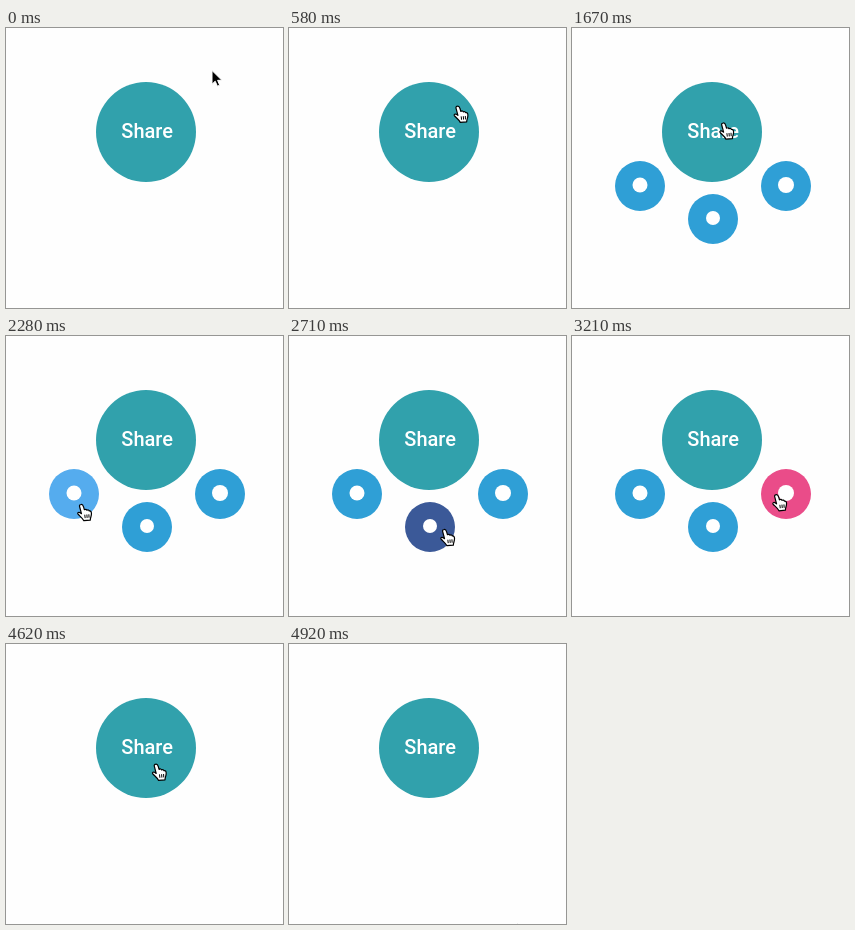
These frames come from a looping animation (277 by 280 pixels, 5.7 s). An HTML page:

```html
<!DOCTYPE html>
<html lang="en">
<head>
<meta charset="utf-8">
<title>Share button</title>
<style>
  html, body { margin: 0; width: 100%; height: 100%; overflow: hidden; background: #fefefe; }
  svg { display: block; width: 277px; height: 280px; }
  text { font: 500 20px Roboto, sans-serif; fill: #fff; }
</style>
</head>
<body>
<svg viewBox="0 0 277 280">
  <g id="bubbles"></g>
  <circle cx="140" cy="104" r="50" fill="#31a1ac"/>
  <text x="115.3" y="110">Share</text>
  <g id="cursor">
    <path id="arrow" d="M.5 .5V14.2L3.7 11.2L5.9 16.2L8.2 15.2L6.1 10.3H10.4Z"
      fill="#000" stroke="#fff" stroke-width="1" stroke-linejoin="round"/>
    <g id="hand" transform="translate(-4 -1)" stroke="#000" stroke-width="1.2" stroke-linejoin="round">
      <path fill="#fff" d="M4.2 1C5.8 .6 6.3 2 6.8 3.6L7.5 6.2C8.8 5.4 9.6 5.8 10 6.7C11.2 6.1 12.1 6.6 12.4 7.5
        C14 7.2 14.6 8.4 14.6 10C14.6 13 13.5 13.7 13.4 16.6L7 17.2C5.5 14.2 2.6 12.4 1 10.4
        C.4 9.2 1.8 8.5 3 9.1L4.6 10.2L2.7 3C2.4 1.9 3 1.2 4.2 1Z"/>
      <path fill="none" stroke-width="1" d="M7.9 11.2L8.3 14.6M10 11L10.3 14.4M12 10.8L12.2 14.2"/>
    </g>
  </g>
</svg>
<script>
const LOOP = 5700, OPEN = 1238, CLOSE = 3600, STAGGER = 100, SLIDE = 220, FADE = 150;
const BASE = [47, 159, 214];
const home = { x: 140, y: 104, r: 50 };
const bubbles = [
  { x: 68, y: 158, r: 25, dot: 7.5, hover: [85, 172, 238] },
  { x: 141, y: 191, r: 25, dot: 7, hover: [59, 89, 152] },
  { x: 214, y: 158, r: 25, dot: 8, hover: [234, 76, 137] },
];

// Pointer tip: [time, x, y], at rest wherever neighbouring points agree
const path = [
  [0, 205.5, 42], [350, 205.5, 42], [720, 151, 95], [1760, 151, 95], [1900, 90, 163],
  [1930, 90, 163], [2060, 74, 168], [2270, 74, 168], [2430, 137, 206], [2640, 137, 206],
  [2850, 204.5, 159], [3200, 204.5, 159], [3390, 149, 119], [4605, 149, 119],
  [4920, 227.5, 279], [LOOP, 227.5, 279],
];

const $ = id => document.getElementById(id);
const mix = (a, b, k) => a + (b - a) * k;
const ease = k => (k = Math.min(1, Math.max(0, k)), k * k * (3 - 2 * k));
const inside = (p, c) => Math.hypot(p.x - c.x, p.y - c.y) < c.r;

function pointer(t) {
  const i = Math.max(1, path.findIndex(p => p[0] >= t));
  const [t0, x0, y0] = path[i - 1], [t1, x1, y1] = path[i];
  const k = ease((t - t0) / (t1 - t0));
  return { x: mix(x0, x1, k), y: mix(y0, y1, k) };
}

// Linear fade: the share of the last FADE ms spent over the bubble
function hoverAmount(bubble, t) {
  const steps = 30;
  let hits = 0;
  for (let i = 0; i < steps; i++) {
    const past = Math.max(0, t - i * FADE / steps);
    if (inside(pointer(past), bubble)) hits++;
  }
  return hits / steps;
}

function addCircle(parent, r, fill) {
  const c = document.createElementNS(parent.namespaceURI, "circle");
  c.setAttribute("r", r);
  c.setAttribute("fill", fill);
  return parent.appendChild(c);
}

for (const b of bubbles) {
  b.group = $("bubbles").appendChild(document.createElementNS($("bubbles").namespaceURI, "g"));
  b.disc = addCircle(b.group, b.r, "#2f9fd6");
  addCircle(b.group, b.dot, "#fff").setAttribute("cy", -1);
}

function place(el, x, y) {
  el.setAttribute("transform", `translate(${x} ${y})`);
}

function draw(t) {
  bubbles.forEach((b, i) => {
    const out = ease((t - OPEN - i * STAGGER) / SLIDE)
      - ease((t - CLOSE - (2 - i) * STAGGER) / SLIDE);
    place(b.group, mix(home.x, b.x, out), mix(home.y, b.y, out));
    const h = hoverAmount(b, t);
    b.disc.setAttribute("fill", `rgb(${BASE.map((c, j) => Math.round(mix(c, b.hover[j], h)))})`);
  });
  const tip = pointer(t);
  const pointing = [home, ...bubbles].some(c => inside(tip, c));
  place($("cursor"), tip.x, tip.y);
  $("hand").style.display = pointing ? "" : "none";
  $("arrow").style.display = pointing ? "none" : "";
}

const start = performance.now();
function frame() {
  draw((performance.now() - start) % LOOP);
  requestAnimationFrame(frame);
}
frame();
</script>
</body>
</html>
```
